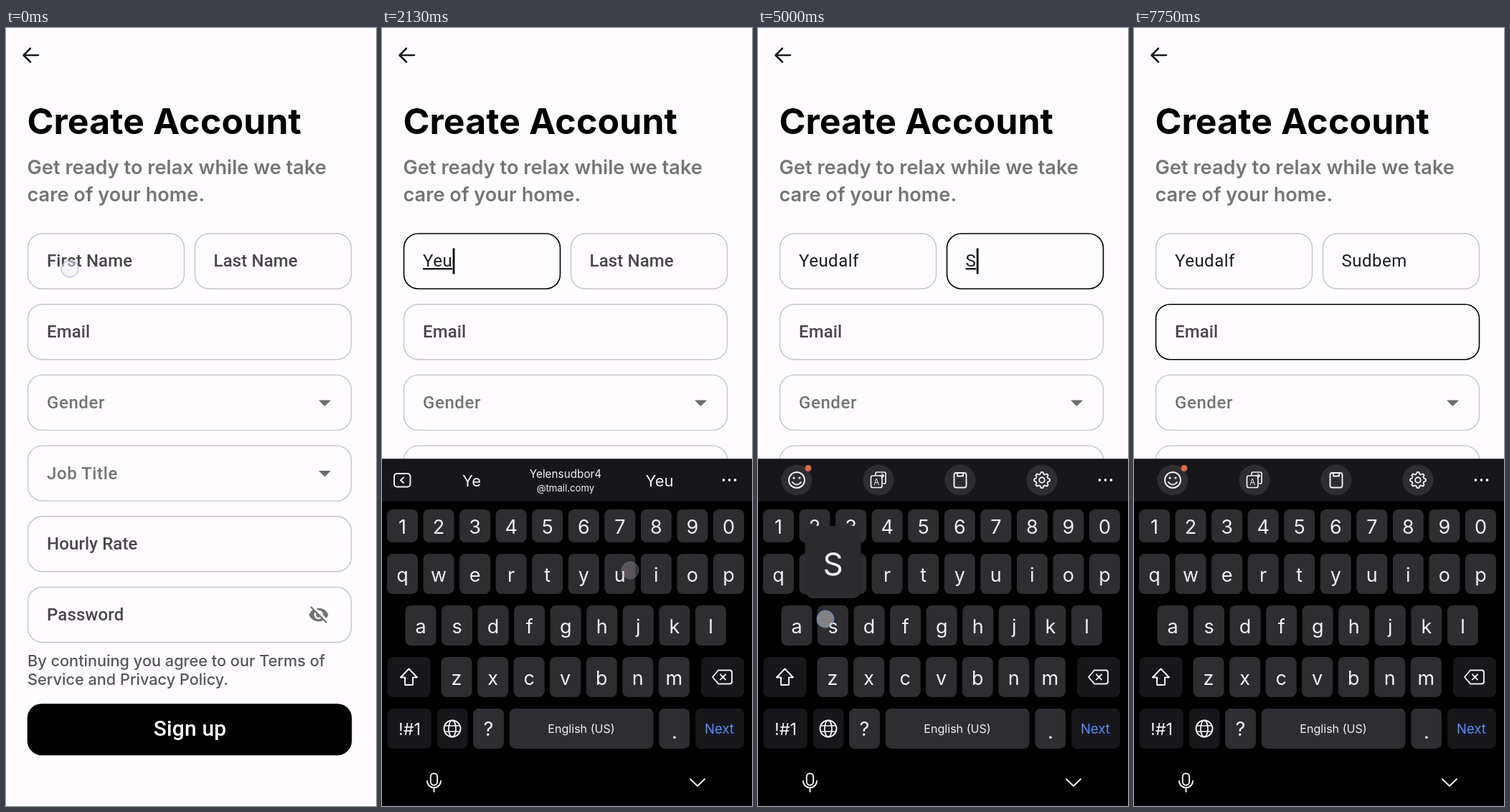
An HTML page that plays this animation: 516x1086 px, repeating every 8000 ms.

```html
<!DOCTYPE html>
<html lang="en">
<head>
<meta charset="utf-8">
<title>Create Account</title>
<style>
  html, body { margin: 0; width: 100%; height: 100%; overflow: hidden; background: #fefcff; }
  svg { display: block; width: 516px; height: 1086px; }
  text { font-family: Inter, sans-serif; white-space: pre; }
  .form { font-family: Roboto, sans-serif; }
  .typing { text-decoration: underline; text-decoration-thickness: 1.5px; }
</style>
</head>
<body>
<svg id="stage" viewBox="0 0 516 1086"></svg>
<script>
const STEP = 125, STEPS = 64;
const INK = '#49454a', GREY = '#757575', KEY = '#2e2d32', DARK = '#17161b', BLUE = '#5b8cf6';
const PAPER = '#fefcff', LIGHT = '#f2f2f4';
const names = ['Yeudalf', 'Sudbem'];
const hints = [['Yeudalf', 'Yeudalf.sudbee|m270835'], ['Sudbem', 'Sudbeem']];
// step of the press, key, place of the finger
const taps = [
  [0, '', 89, 336], [8, 'shift', 40, 908], [10, '', 286, 761], [11, 'Y', 286, 761],
  [13, 'e', 136, 764], [15, 'u', 346, 757], [18, 'd', 148, 828], [20, 'a', 60, 830],
  [22, 'l', 452, 830], [24, 'f', 195, 829], [32, 'next', 470, 980], [36, 'shift', 40, 908],
  [39, 'S', 94, 825], [41, 'u', 340, 760], [44, 'd', 150, 829], [49, 'b', 317, 918],
  [51, 'e', 134, 764], [54, 'm', 412, 910], [57, 'next', 470, 980]
];
const FOCUS = [2, 33, 58];

const rect = (x, y, w, h, r, fill, more = '') =>
  `<rect x="${x}" y="${y}" width="${w}" height="${h}" rx="${r}" fill="${fill}" ${more}/>`;
const circle = (x, y, r, fill, more = '') => `<circle cx="${x}" cy="${y}" r="${r}" fill="${fill}" ${more}/>`;
const line = (d, color = LIGHT, w = 1.9) =>
  `<path d="${d}" fill="none" stroke="${color}" stroke-width="${w}" stroke-linecap="round" stroke-linejoin="round"/>`;
const text = (x, y, s, size, fill, more = '') =>
  `<text x="${x}" y="${y}" font-size="${size}" fill="${fill}" ${more}>${s}</text>`;
const mid = (x, y, s, size, fill = LIGHT) => text(x, y, s, size, fill, 'text-anchor="middle"');
const outline = (w = 1.9) => `stroke="${LIGHT}" stroke-width="${w}"`;

const pen = document.createElement('canvas').getContext('2d');
function typedWidth(s) {
  pen.font = '24px Roboto, sans-serif';
  return pen.measureText(s).width + s.length * 0.5;
}

const isLetter = key => key.length === 1;
const focusAt = k => FOCUS.filter(s => s <= k).length - 1;
const typed = (k, field) => {
  const count = taps.filter(([p, key]) => isLetter(key) && p < k && (p < FOCUS[1] ? 0 : 1) === field).length;
  return (names[field] || '').slice(0, count);
};

function caretOn(k) {
  const resets = taps.filter(t => isLetter(t[1])).map(t => t[0] + 1).concat(FOCUS);
  const last = Math.max(...resets.filter(s => s <= k));
  return Math.floor((k - last) / 4) % 2 === 0;
}

const LABEL = 'class="form" font-weight="500" letter-spacing=".13"';
const MENU = 'class="form" font-weight="500" letter-spacing=".6"';

function page() {
  const sub = 'font-weight="600"', small = 'font-weight="500"';
  const drop = y => `<path d="M436 ${y}h17l-8.500 8.500z" fill="#6b6b6d"/>`;
  const eye = `<path d="M422.500 819C427 806.500 445 806.500 449.500 819C445 831.500 427 831.500 422.500 819Z" fill="${GREY}"/>`
    + circle(436, 819, 5, GREY, `stroke="${PAPER}" stroke-width="2.4"`)
    + line('M427.500 807l21 21', PAPER, 3) + line('M425.500 808.500l21 21', GREY, 2.4);
  return rect(0, 0, 516, 1086, 0, PAPER)
    + line('M45 38H25M34 28.500L24.500 38L34 47.500', '#1d1b20', 2.5)
    + text(29.5, 148, 'Create Account', 50, '#000', 'font-weight="700" letter-spacing=".1"')
    + text(29.5, 204, 'Get ready to relax while we take', 27.2, GREY, sub)
    + text(29.5, 242, 'care of your home.', 27.2, GREY, sub)
    + text(57, 531, 'Gender', 24, GREY, MENU) + drop(519.5)
    + text(57, 629.5, 'Job Title', 24, GREY, MENU) + drop(618)
    + text(57, 728, 'Hourly Rate', 24, INK, LABEL)
    + text(57, 827, 'Password', 24, INK, LABEL) + eye
    + text(30, 891, 'By continuing you agree to our Terms of', 21.7, '#58555a', small)
    + text(30, 917, 'Service and Privacy Policy.', 21.7, '#58555a', small)
    + rect(29.7, 943.2, 452.6, 72, 20, '#000')
    + text(256.5, 988, 'Sign up', 30, '#fff', LABEL + ' text-anchor="middle"');
}

function fields(k) {
  const focus = focusAt(k);
  const boxes = [[30.5, 287, 218], [263.5, 287, 218]];
  for (let i = 1; i < 6; i++) boxes.push([30.5, 287 + 98.7 * i, 451]);
  let out = boxes.map(([x, y, w], i) => rect(x, y, w, 77, 20, 'none',
    i === focus ? 'stroke="#000" stroke-width="1.6"' : 'stroke="#c5c3c8" stroke-width="1.4"')).join('');
  [['First Name', 57, 333], ['Last Name', 289.5, 333], ['Email', 57, 432]].forEach(([label, x, y], i) => {
    const value = typed(k, i);
    out += value
      ? text(x, y, value, 24, '#1d1b20', `class="form ${i === focus ? 'typing' : ''}" letter-spacing=".5"`)
      : text(x, y, label, 24, INK, LABEL);
    if (i === focus && caretOn(k)) out += rect(x + 0.5 + typedWidth(value), y - 25.5, 2.8, 36, 0, '#000');
  });
  return out;
}

function gear(x, y) {
  let d = '';
  for (let i = 0; i < 48; i++) {
    const a = i / 48 * 2 * Math.PI, r = 9.8 + 1.3 * Math.tanh(2.5 * Math.cos(8 * a));
    d += (i ? 'L' : 'M') + (x + r * Math.sin(a)).toFixed(1) + ' ' + (y - r * Math.cos(a)).toFixed(1);
  }
  return line(d + 'Z') + circle(x, y, 3.8, 'none', outline());
}

function tools() {
  return [54, 168, 282, 396].map(x => circle(x, 631, 21.5, KEY)).join('')
    + circle(54, 631, 11, 'none', outline())
    + circle(50, 628, 1.6, LIGHT) + circle(58, 628, 1.6, LIGHT) + line('M48 634Q54 641 60 634')
    + circle(70, 614.5, 4.5, '#d2694b')
    + line('M164 624V622Q164 620 166 620H176Q178 620 178 622V634Q178 636 176 636H175', undefined, 1.7)
    + rect(157.5, 625, 15.5, 16.5, 2.5, KEY, outline(1.7))
    + mid(165.2, 637.5, 'A', 11.5) + line('M170 625h5m-2-2.500l2.500 2.500l-2.500 2.500', undefined, 1.4)
    + rect(273.5, 621, 17, 20.500, 3, 'none', outline())
    + line('M278 621V625.500H286V621') + gear(396, 631);
}

function suggestions(k, field) {
  const word = typed(k - 1, field), [full, long] = hints[field];
  const list = field === 0 && word.length === 3
    ? ['Ye', 'Yelensudbor4|@tmail.comy', word]
    : [word.slice(0, full.length - 1), full, long];
  return rect(17, 622, 22.5, 18.5, 4, 'none', outline()) + line('M30 627.500L26 631.300L30 635')
    + list.map((s, i) => {
      const x = 125 + 131 * i, [top, bottom] = s.split('|');
      if (!bottom) return mid(x, 640, s, 22);
      const domain = bottom[0] === '@';
      return mid(x, 628, top, 15.3) + mid(x, domain ? 647 : 650, bottom, domain ? 13.2 : 15.3);
    }).join('');
}

const ROWS = [['1234567890', 28.5, 672, 46], ['qwertyuiop', 28.5, 734, 56],
  ['asdfghjkl', 54, 806, 56], ['zxcvbnm', 104, 878, 56]];
const PITCH = 50.55;

function keyboard(k, tap) {
  const focus = focusAt(k), age = tap ? k - tap[0] : 9, pressed = tap && age < 2 ? tap[1] : '';
  const caps = (k > 8 && k < 12) || (k > 36 && k < 40);
  const side = name => pressed === name ? '#35343a' : DARK;
  let out = rect(0, 601.5, 516, 485, 0, '#000') + rect(0, 601.5, 516, 59, 0, DARK), popup = '';
  out += focus >= 0 && typed(k - 1, focus) ? suggestions(k, focus) : tools();
  for (const x of [476.5, 484.5, 492.5]) out += circle(x, 631, 1.9, LIGHT);

  for (const [letters, left, y, h] of ROWS) [...letters].forEach((c, i) => {
    const x = left + PITCH * i, hit = isLetter(pressed) && c === pressed.toLowerCase();
    out += rect(x - 21.5, y, 43, h, 8, hit && age === 0 ? '#4b4a50' : KEY)
      + mid(x, y + h / 2 + 10.5, caps ? c.toUpperCase() : c, 27);
    if (hit) popup = rect(x - 39, y - 111, 78, 101, 12, '#2b2a2f') + mid(x, y - 42, pressed, 44);
  });

  out += rect(7.5, 878, 60, 56, 8, side('shift'))
    + line('M37.500 894.500L49 906.500H43V917H32V906.500H26Z', caps ? BLUE : undefined, 2)
    + rect(445, 878, 60, 56, 8, DARK)
    + line('M469 896.500H485Q488 896.500 488 899.500V912.500Q488 915.500 485 915.500H469L461 906ZM472 902.500l7 7m0-7l-7 7')
    + rect(7.5, 950, 61.5, 56, 8, DARK) + mid(38.5, 987, '!#1', 23.5)
    + rect(77, 950, 42.5, 56, 8, DARK)
    + circle(98, 978, 11.5, 'none', outline())
    + `<ellipse cx="98" cy="978" rx="5" ry="11.5" fill="none" ${outline(1.8)}/>`
    + line('M88 974H108M88 982H108', undefined, 1.7)
    + rect(127, 950, 43, 56, 8, KEY) + mid(148.5, 988, '?', 27)
    + rect(178, 950, 200.5, 56, 8, KEY) + mid(278, 984, 'English (US)', 16.1)
    + rect(386.5, 950, 42.5, 56, 8, KEY) + mid(408, 992, '.', 27)
    + rect(437, 950, 68, 56, 8, side('next')) + mid(470.5, 984.5, 'Next', 18.5, BLUE)
    + rect(67.8, 1040.5, 9.4, 16.5, 4.7, 'none', outline(2))
    + line('M63 1051A9.500 9.500 0 0 0 82 1051M72.500 1061V1066', undefined, 2)
    + line('M430 1048.500L440 1058L450 1048.500', undefined, 2);
  const rise = Math.min(1, Math.max(0, (k - 2) / 5));
  return rise ? `<g transform="translate(0 ${485 * (1 - rise) ** 2})">${out}${popup}</g>` : '';
}

function finger(k, tap) {
  if (!tap || k - tap[0] > 2) return '';
  const alpha = (tap[0] === 0 ? [0.6, 0.9, 0.4] : [0.95, 0.68, 0.33])[k - tap[0]];
  return circle(tap[2], tap[3], 11.8, k < 3 ? '#eeeef2' : '#c3c0c6',
    `fill-opacity="${alpha * 0.85}" stroke="#7f9fd2" stroke-opacity="${alpha}" stroke-width="1.3"`);
}

const stage = document.getElementById('stage');
const base = page();
const start = performance.now();
let shown = -1;
function play() {
  const k = Math.floor((performance.now() - start) / STEP) % STEPS;
  if (k !== shown) {
    const tap = taps.filter(t => t[0] <= k).pop();
    stage.innerHTML = base + fields(k) + keyboard(k, tap) + finger(k, tap);
    shown = k;
  }
  requestAnimationFrame(play);
}
play();
</script>
</body>
</html>
```
